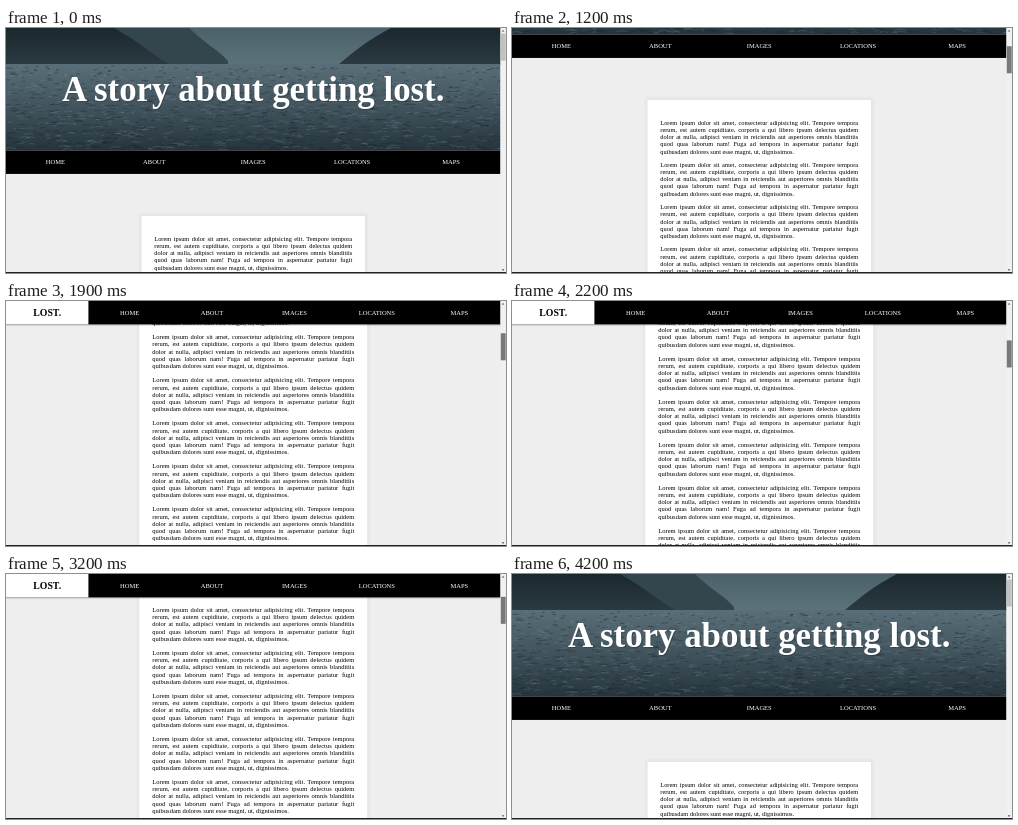
An HTML page that plays this animation: 500x245 px, repeating every 4400 ms.

```html
<!DOCTYPE html>
<html lang="en">
<head>
<meta charset="utf-8">
<title>A story about getting lost</title>
<style>
  * { box-sizing: border-box; }
  html, body { margin: 0; width: 100%; height: 100%; overflow: hidden; background: #eee; }
  #stage { position: relative; width: 500px; height: 245px; overflow: hidden; background: #eee; }
  /* The site is laid out at desktop size, then shown small. */
  #view {
    position: absolute; left: 0; top: 0; width: 1535px; height: 753px; overflow: hidden;
    transform: scale(.325733); transform-origin: 0 0;
    font: 20px/22.4px "Liberation Serif", "Times New Roman", serif;
  }
  #page { position: absolute; left: 0; top: 0; width: 1518px; }
  header {
    position: relative; height: 376px; overflow: hidden;
    display: flex; align-items: center; justify-content: center;
  }
  header svg { position: absolute; left: 0; top: 0; width: 100%; height: 100%; }
  h1 {
    position: relative; margin: 0; color: #fff; white-space: nowrap;
    font-size: 107px; line-height: 1.15; text-shadow: 3px 4px 0 rgba(0,0,0,.2);
  }
  nav {
    position: absolute; left: 0; top: 0; width: 1518px; height: 72px;
    display: flex; background: #000; color: #fff;
  }
  nav span {
    flex: 1; display: flex; align-items: center; justify-content: center;
    overflow: hidden; white-space: nowrap;
  }
  #logo { background: #fff; color: #000; font-size: 30px; font-weight: bold; }
  article {
    width: 700px; margin: 142px auto 70px; padding: 40px; background: #fff; color: #000;
    text-align: justify; box-shadow: 0 0 10px 5px rgba(0,0,0,.05);
  }
  article p { margin: 20px 0; }
  #bar { position: absolute; right: 0; top: 0; width: 17px; height: 753px; background: #f1f1f1; }
  #thumb { position: absolute; left: 1px; width: 15px; height: 83px; }
  #bar i { position: absolute; left: 4px; border: solid transparent; border-width: 0 4.5px; }
  #bar .up { top: 6px; border-bottom: 5px solid #505050; }
  #bar .down { bottom: 7px; border-top: 5px solid #505050; }
  #edge { position: absolute; left: 0; top: 244px; width: 500px; height: 1px; background: #222; }
</style>
</head>
<body>
<div id="stage">
  <div id="view">
    <div id="page">
      <header>
        <svg viewBox="0 0 494.5 122.5" preserveAspectRatio="none">
          <defs>
            <linearGradient id="sky" x2="0" y2="1">
              <stop offset="0" stop-color="#4b6169"/><stop offset="1" stop-color="#5d737b"/>
            </linearGradient>
            <linearGradient id="hill" x2="0" y2="1">
              <stop offset="0" stop-color="#1b282e"/><stop offset="1" stop-color="#2b3b42"/>
            </linearGradient>
            <linearGradient id="sea" x2="0" y2="1">
              <stop offset="0" stop-color="#596e78"/><stop offset=".4" stop-color="#465963"/>
              <stop offset="1" stop-color="#25343c"/>
            </linearGradient>
          </defs>
          <rect width="495" height="37" fill="url(#sky)"/>
          <path d="M0 0H183Q196 12 206 19T222 33V37H0Z" fill="#33464e"/>
          <path d="M0 0H108Q126 10 139 20T165 37H0Z" fill="url(#hill)"/>
          <path d="M332 37Q346 25 357 17T385 0H495V37Z" fill="url(#hill)"/>
          <rect y="36" width="495" height="87" fill="url(#sea)"/>
          <path id="light" fill="none" stroke="#90a3ac" stroke-opacity=".3" stroke-width=".7"/>
          <path id="dark" fill="none" stroke="#14222a" stroke-opacity=".4" stroke-width=".9"/>
        </svg>
        <h1>A story about getting lost.</h1>
      </header>
      <article id="article"></article>
    </div>
    <nav id="nav">
      <span id="logo">LOST.</span><span>HOME</span><span>ABOUT</span><span>IMAGES</span><span>LOCATIONS</span><span>MAPS</span>
    </nav>
    <div id="bar"><i class="up"></i><div id="thumb"></div><i class="down"></i></div>
  </div>
  <div id="edge"></div>
</div>
<script>
const $ = id => document.getElementById(id);
const LOOP = 4400, STEP = 100;
const ZOOM = 500 / 1535, HEADER = 376, PAGE_H = 6506, TRACK = 719;
const STICK = 1230, UNSTICK = 3490, TURN = 210;

// Scroll offset on stage over time: [ms, px]
const scrollKeys = [
  [800, 0], [900, 7], [1000, 38], [1100, 78], [1200, 116], [1300, 128], [1500, 142],
  [1800, 215], [2100, 296], [2200, 306.5], [2400, 306.5], [2500, 294], [2800, 227.2],
  [3100, 172], [3400, 125], [3500, 58.5], [3600, 14], [3700, 0]
];

const lorem = "Lorem ipsum dolor sit amet, consectetur adipisicing elit. Tempore tempora rerum, " +
  "est autem cupiditate, corporis a qui libero ipsum delectus quidem dolor at nulla, adipisci " +
  "veniam in reiciendis aut asperiores omnis blanditiis quod quas laborum nam! Fuga ad tempora " +
  "in aspernatur pariatur fugit quibusdam dolores sunt esse magni, ut, dignissimos.";
$("article").innerHTML = `<p>${lorem}</p>`.repeat(44);

// Short ripples, longer and sparser towards the viewer
let seed = 11;
const rand = () => (seed = seed * 16807 % 2147483647) / 2147483647;
function ripples(count) {
  let d = "";
  for (let i = 0; i < count; i++) {
    const depth = rand(), len = 3 + depth * 9 * rand();
    const x = rand() * 500 - 4, y = 38 + depth * 84;
    d += `M${x.toFixed(1)} ${y.toFixed(1)}q${(len / 2).toFixed(1)} ${(-depth * 2).toFixed(1)} ${len.toFixed(1)} 0`;
  }
  return d;
}
$("light").setAttribute("d", ripples(650));
$("dark").setAttribute("d", ripples(750));

const clamp = x => Math.max(0, Math.min(1, x));
const smooth = x => x * x * (3 - 2 * x);
const ramp = (t, start) => smooth(clamp((t - start) / TURN));

function scrollAt(t) {
  const i = scrollKeys.findIndex(k => k[0] > t);
  if (i < 1) return 0;
  const [t0, a] = scrollKeys[i - 1], [t1, b] = scrollKeys[i];
  return a + (b - a) * (t - t0) / (t1 - t0);
}

function thumbColor(t) {
  if (t >= 900 && t < 4000) return "#787878";
  return t >= 600 && t < 4200 ? "#a8a8a8" : "#c1c1c1";
}

function draw(t) {
  const y = scrollAt(t) / ZOOM;
  const stuck = ramp(t, STICK) - ramp(t, UNSTICK);
  $("page").style.transform = `translateY(${-y}px)`;
  $("nav").style.transform = `translateY(${Math.max(0, HEADER - y)}px)`;
  $("nav").style.boxShadow = `0 5px 0 rgba(0,0,0,${0.1 * stuck})`;
  $("logo").style.maxWidth = 500 * stuck + "px";
  $("article").style.transform = `scale(${0.98 + 0.02 * stuck})`;
  $("thumb").style.top = 17 + y / PAGE_H * TRACK + "px";
  $("thumb").style.background = thumbColor(t);
}

const begin = performance.now();
function tick() {
  const t = (performance.now() - begin) % LOOP;
  draw(Math.floor(t / STEP) * STEP);
  requestAnimationFrame(tick);
}
tick();
</script>
</body>
</html>
```
